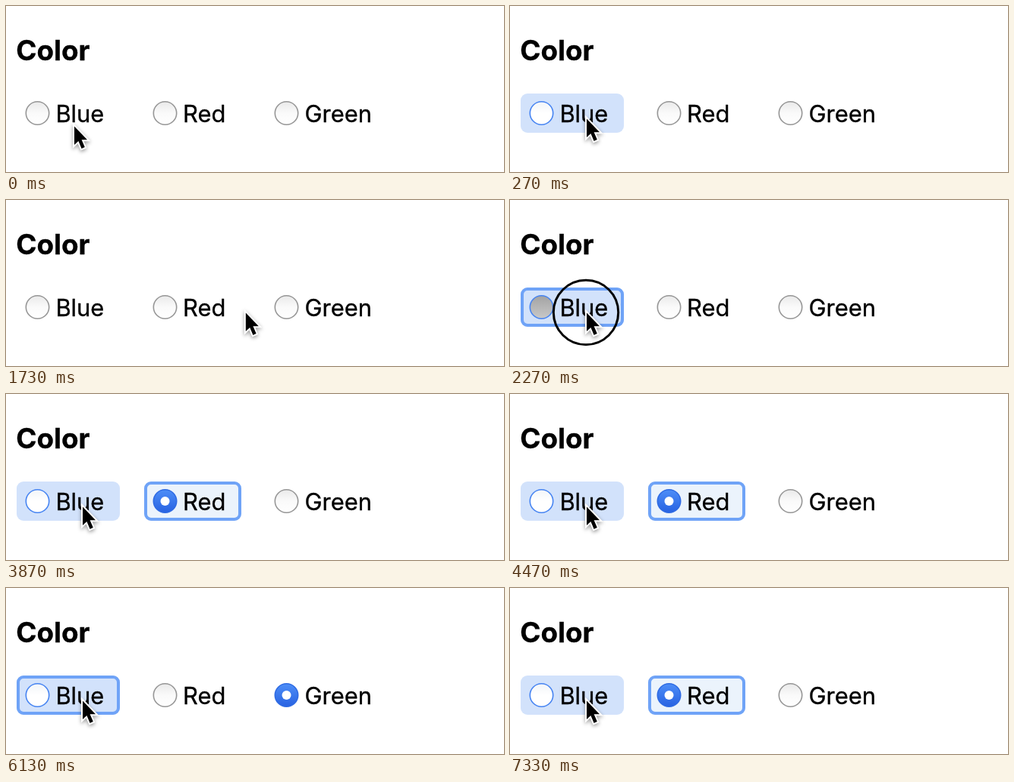
Animation of 656 by 220 pixels, one loop 8000 ms. Source, as an HTML page with a canvas:

```html
<!DOCTYPE html>
<html lang="en">
<head>
<meta charset="utf-8">
<title>Color radio group</title>
<style>
  html, body { margin: 0; width: 100%; height: 100%; overflow: hidden; background: #fff; }
  canvas { display: block; }
</style>
</head>
<body>
<canvas id="stage" width="656" height="220"></canvas>
<script>
const ctx = document.getElementById('stage').getContext('2d');
const LOOP = 8000;

const BLUE = 0, RED = 1, GREEN = 2, NONE = -1;
const options = [
  { label: 'Blue', x: 14, width: 136, textX: 65.4 },
  { label: 'Red', x: 182, width: 128, textX: 233 },
  { label: 'Green', x: 342, width: 160, textX: 393.5 },
];
const TOP = 116, HEIGHT = 52;

// Each track lists [start time, value]; values change without a transition.
const focusTrack = [
  [0, NONE], [2200, BLUE], [2870, RED], [4070, GREEN], [4470, RED],
  [5070, GREEN], [6000, BLUE], [6530, RED],
];
const checkedTrack = [
  [0, NONE], [2400, BLUE], [3600, RED], [5600, GREEN], [6330, BLUE], [7130, RED],
];
const pressedTrack = [
  [0, NONE], [2200, BLUE], [2400, NONE], [3400, RED], [3600, NONE],
  [5400, GREEN], [5600, NONE], [6200, BLUE], [6330, NONE], [7070, RED], [7130, NONE],
];

// Pointer moves: [start, end, from, to]
const moves = [
  [40, 130, [89, 157], [100, 147]],
  [1032, 1402, [100, 147], [387, 147]],
  [1600, 2000, [387, 147], [100, 147]],
];

const valueAt = (track, t) => track.filter(([start]) => start <= t).pop()[1];
const ease = p => p * p * (3 - 2 * p);

function pointerAt(t) {
  const [start, end, from, to] = moves.filter(m => m[0] <= t).pop() || moves[0];
  const p = ease(Math.min(1, Math.max(0, (t - start) / (end - start))));
  return from.map((v, i) => v + (to[i] - v) * p);
}

function hoveredAt(t, [x, y]) {
  if (t < 65) return NONE;
  return options.findIndex(o =>
    x >= o.x && x <= o.x + o.width && y >= TOP && y <= TOP + HEIGHT);
}

function roundRect(x, y, w, h, r) {
  ctx.beginPath();
  ctx.roundRect(x, y, w, h, r);
}

function circle(x, y, r) {
  ctx.beginPath();
  ctx.arc(x, y, r, 0, Math.PI * 2);
}

function vertical(y0, y1, ...colors) {
  const g = ctx.createLinearGradient(0, y0, 0, y1);
  colors.forEach((c, i) => g.addColorStop(i / (colors.length - 1), c));
  return g;
}

// A hairline stroke gives the glyphs a slightly heavier weight.
function text(str, x, y, font) {
  ctx.font = font;
  ctx.fillStyle = ctx.strokeStyle = '#000';
  ctx.lineWidth = 0.35;
  ctx.lineJoin = 'round';
  ctx.fillText(str, x, y);
  ctx.strokeText(str, x, y);
}

function drawRadio(x, y, { checked, pressed, accent }) {
  circle(x, y, 15.2);
  if (checked) {
    ctx.fillStyle = vertical(y - 16, y + 16, '#4e8ff8', '#2761e1');
    ctx.strokeStyle = '#2f6be3';
  } else {
    ctx.fillStyle = pressed
      ? vertical(y - 16, y + 16, '#a2a2a2', '#c9c9c9')
      : accent
        ? vertical(y - 16, y + 16, '#f1f4f8', '#ffffff', '#ffffff')
        : vertical(y - 16, y + 16, '#e9e9e9', '#fafafa', '#ffffff');
    ctx.strokeStyle = accent ? '#4684f2' : '#969696';
  }
  ctx.fill();
  ctx.lineWidth = 1.6;
  ctx.stroke();
  if (checked) {
    circle(x, y, 6);
    ctx.fillStyle = '#fff';
    ctx.fill();
  }
}

function drawOption(o, state) {
  if (state.hovered || state.focused) {
    roundRect(o.x, TOP, o.width, HEIGHT, 9);
    ctx.fillStyle = state.hovered ? '#d2e2fb' : '#ebf3fc';
    ctx.fill();
  }
  if (state.focused) {
    roundRect(o.x + 2, TOP + 2, o.width - 4, HEIGHT - 4, 7);
    ctx.strokeStyle = '#6fa3f7';
    ctx.lineWidth = 4;
    ctx.stroke();
  }
  drawRadio(o.x + 27.5, 142, { ...state, accent: state.hovered || state.focused });
  text(o.label, o.textX, 154, '400 30.9px Inter, sans-serif');
}

const arrow = new Path2D('M1 2.5 V27 L6.4 21.9 L10.6 31.9 L14.8 30.1 L10.6 20.3 H18 Z');

function drawPointer([x, y]) {
  ctx.save();
  ctx.translate(x, y);
  ctx.lineJoin = 'miter';
  ctx.lineWidth = 4;
  ctx.strokeStyle = '#fff';
  ctx.shadowColor = 'rgba(0, 0, 0, 0.4)';
  ctx.shadowBlur = 5;
  ctx.shadowOffsetY = 2;
  ctx.stroke(arrow);
  ctx.shadowColor = 'transparent';
  ctx.fillStyle = '#000';
  ctx.fill(arrow);
  ctx.restore();
}

function draw(t) {
  const pointer = pointerAt(t);
  const hovered = hoveredAt(t, pointer);
  const focused = valueAt(focusTrack, t);
  const checked = valueAt(checkedTrack, t);
  const pressed = valueAt(pressedTrack, t);

  ctx.fillStyle = '#fff';
  ctx.fillRect(0, 0, 656, 220);
  text('Color', 13.2, 72, '700 36.8px Inter, sans-serif');
  options.forEach((o, i) => drawOption(o, {
    hovered: i === hovered,
    focused: i === focused,
    checked: i === checked,
    pressed: i === pressed,
  }));

  if (t >= 2200 && t < 2400) {
    circle(100, 149, 42.7);
    ctx.strokeStyle = '#000';
    ctx.lineWidth = 3;
    ctx.stroke();
  }
  drawPointer(pointer);
}

const origin = performance.now();
function frame() {
  draw((performance.now() - origin) % LOOP);
  requestAnimationFrame(frame);
}
frame();
</script>
</body>
</html>
```
